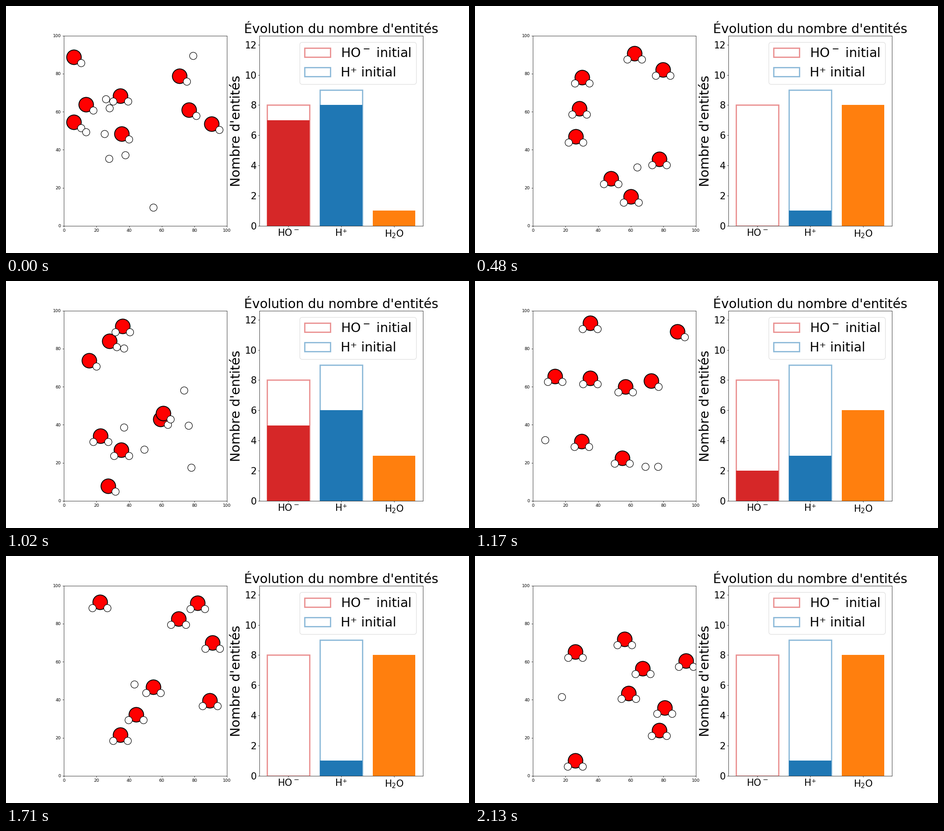
Recreate the animation shown at these times as a matplotlib script. Size 1025x547 px, loop 2.16 s.

```python
import numpy as np
import matplotlib.pyplot as plt
from matplotlib.animation import FuncAnimation

W, H, DPI = 1025, 547, 205 / 3
FRAMES, STEP = 72, 30
RESTART = 32            # the mixture starts afresh here
LO, HI = 5, 95          # walls the centres bounce off
RIGHT, LEFT = np.array([4.5, -3.0]), np.array([-4.5, -3.0])
N_HO, N_H = 8, 9
rng = np.random.default_rng(7)


def anywhere(n):
    return rng.uniform(8, 92, (n, 2))


def fold(p):
    span = HI - LO
    return LO + span - np.abs((p - LO) % (2 * span) - span)


def fly(keys, poses):
    """Straight flights through the poses, some by way of the nearer wall."""
    path = []
    for k0, k1, a, b in zip(keys, keys[1:], poses, poses[1:]):
        wall = np.where(a + b < LO + HI, 2 * LO - b, 2 * HI - b)
        end = np.where(rng.random(b.shape) < 0.4, wall, b)
        path += [fold(a + (end - a) * i / (k1 - k0)) for i in range(k1 - k0)]
    return np.array(path + [poses[-1]])


def pts(*xy):
    return np.array(xy, float).reshape(-1, 2)


# eight oxygens, then the proton left over
run1 = [
    pts(6.1, 88.7, 13.5, 63.8, 6.1, 54.5, 34.7, 68.4, 35.4, 48.5,
        70.9, 78.9, 76.7, 61.0, 90.6, 53.6, 54.7, 9.7),
    pts(30.2, 78.0, 28.5, 61.7, 26.3, 46.9, 62.3, 90.6, 47.9, 25.0,
        79.7, 82.0, 77.5, 35.1, 60.2, 15.3, 64.0, 30.8),
    pts(34.9, 57.2, 24.1, 37.4, 31.4, 21.7, 80.0, 66.1, 53.4, 36.5,
        87.5, 45.3, 72.1, 44.9, 73.0, 32.8, 15.9, 68.4),
    anywhere(9),
]
run2 = [
    anywhere(9),
    pts(35.0, 93.4, 13.5, 65.6, 35.2, 64.5, 56.8, 60.1, 29.9, 31.4,
        54.7, 22.6, 88.6, 89.1, 72.4, 63.0, 7.4, 32.1),
    pts(15.5, 88.2, 13.0, 54.5, 30.3, 32.8, 47.3, 77.6, 9.1, 22.2,
        55.9, 13.8, 81.8, 48.6, 88.9, 13.7, 9.3, 45.3),
    pts(22.0, 91.3, 54.8, 46.7, 44.2, 32.3, 70.2, 82.5, 34.6, 21.5,
        89.5, 39.7, 82.0, 90.8, 91.1, 70.0, 43.3, 48.1),
    pts(56.2, 71.8, 26.0, 65.2, 58.7, 43.5, 67.4, 56.5, 25.9, 8.0,
        77.4, 24.0, 93.9, 60.5, 80.7, 35.7, 17.8, 41.6),
]
body = np.concatenate([fly([0, 16, 28, RESTART - 1], run1),
                       fly([RESTART, 39, 46, 57, FRAMES - 1], run2)])
oxygen, spare = body[:, :8], body[:, 8:]

# frame in which each oxygen takes its second proton
bond1 = np.array([6, 2, 1, 0, 3, 5, 8, 11])
bond2 = np.array([32, 33, 34, 35, 36, 38, 42, 44])
proton = oxygen + LEFT


def approach(i, t0, t1, start):
    goal = oxygen[t1, i] + LEFT
    for t in range(t0, t1):
        proton[t, i] = start + (goal - start) * (t - t0) / (t1 - t0)


free = pts(25.6, 66.7, 27.8, 61.9, 13.4, 49.4, 34.7, 68.4, 25.0, 48.3,
           79.3, 89.4, 37.6, 37.2, 27.7, 35.4)
for i in range(8):
    approach(i, 0, bond1[i], free[i])

late = pts(76.8, 17.9, 69.0, 18.0)
proton[RESTART:40, 6:] = fly([RESTART, 39], [anywhere(2), late])
for i, start in enumerate(anywhere(6)):
    approach(i, RESTART, bond2[i], start)
for i in (6, 7):
    approach(i, 39, bond2[i], late[i - 6])

# figure
eps = 1e-4
fig, (box, chart) = plt.subplots(
    1, 2, figsize=((W + eps) / DPI, (H + eps) / DPI), dpi=DPI)
fig.subplots_adjust(left=0.125, right=0.9, bottom=0.11, top=0.88, wspace=0.2)

box.set(xlim=(0, 100), ylim=(0, 100))
big, = box.plot([], [], "o", ms=34, mfc="red", mec="black", mew=2)
small, = box.plot([], [], "o", ms=17, mfc="white", mec="black", mew=1.2)

ho = r"HO$^{\hspace{0.2}{-}\hspace{0.2}}$"
hplus = "H⁺"
names = [ho, hplus, "H$_2$O"]
colors = ["tab:red", "tab:blue", "tab:orange"]
for x, (n, name) in enumerate([(N_HO, ho), (N_H, hplus)]):
    chart.bar(x, n, fill=False, edgecolor=colors[x], linewidth=3, alpha=0.5,
              label=name + " initial")
bars = chart.bar(range(3), [0, 0, 0], color=colors)
chart.set(xlim=(-0.54, 2.54), ylim=(0, 1.4 * N_H))
chart.set_xticks(range(3), names)
chart.set_yticks(range(0, 13, 2))
chart.tick_params(labelsize=22)
chart.set_title("Évolution du nombre d'entités", fontsize=30)
chart.set_ylabel("Nombre d'entités", fontsize=30)
chart.legend(fontsize=30, loc="upper right")


def draw(t):
    big.set_data(*oxygen[t].T)
    small.set_data(*np.vstack([oxygen[t] + RIGHT, proton[t], spare[t]]).T)
    water = int(np.sum((bond1 if t < RESTART else bond2) <= t))
    for bar, n in zip(bars, (N_HO - water, N_H - water, water)):
        bar.set_height(n)
    return big, small, *bars


anim = FuncAnimation(fig, draw, frames=FRAMES, interval=STEP,
                     init_func=lambda: draw(0), repeat=True, repeat_delay=0)
plt.show()
```
